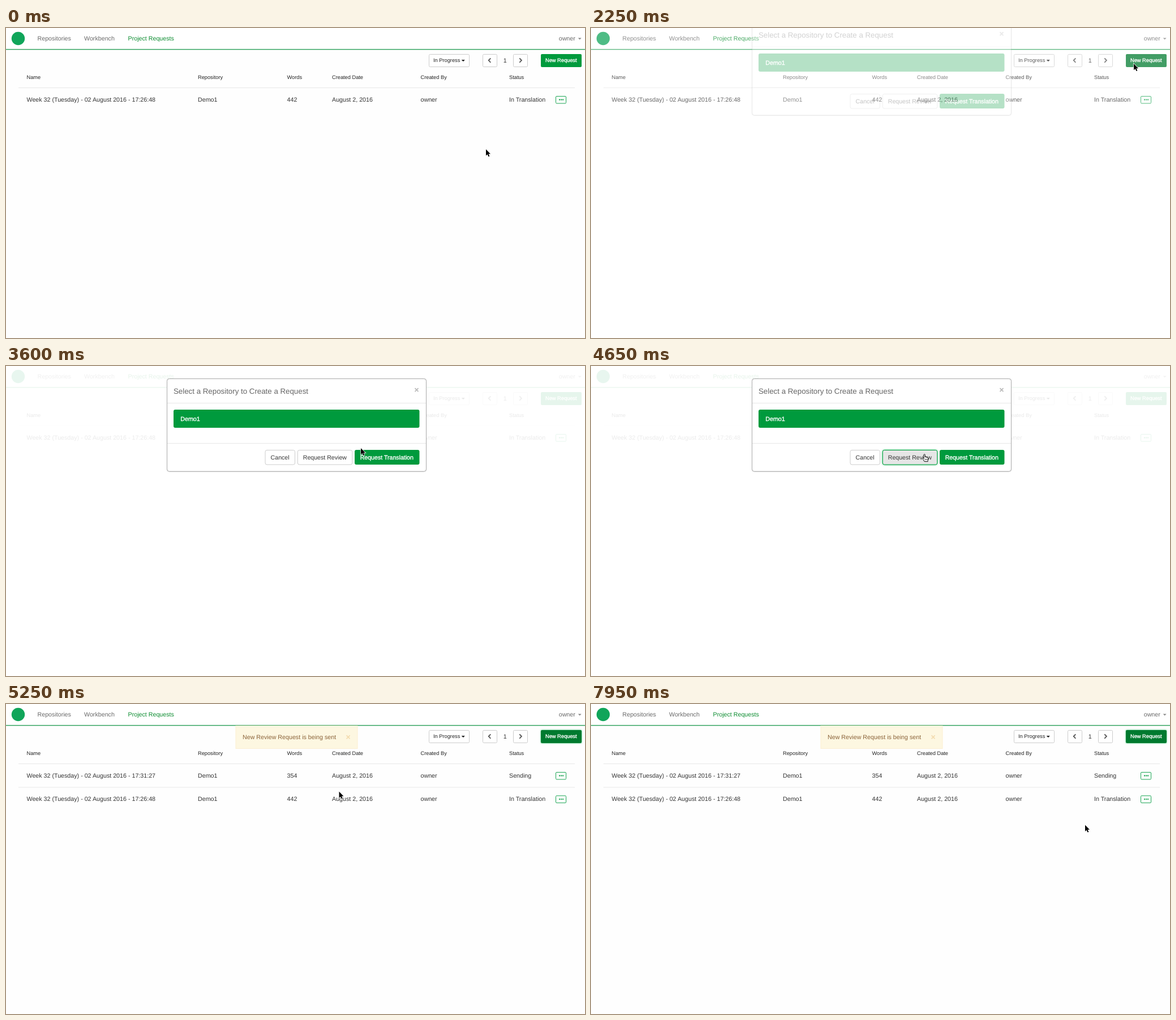
Write an HTML page that moves like this. It is 1023 px wide and 547 px high and loops after 8000 ms.

```html
<!DOCTYPE html>
<html lang="en">
<head>
<meta charset="utf-8">
<title>Project Requests</title>
<style>
  html, body { margin: 0; width: 100%; height: 100%; overflow: hidden; background: #fefefe; }
  svg { display: block; }
  text { font: 10.7px "Liberation Sans", Arial, sans-serif; fill: #333; text-rendering: geometricPrecision; }
  .small { font-size: 9.25px; fill: #222; }
  .button text { font-size: 10.6px; }
  .nav text { fill: #6a6a6a; }
  .nav .active { fill: #0c8c30; }
  .white, .button .white { fill: #fff; stroke: #fff; stroke-width: .35; }
  .box { fill: #fff; stroke: #ccc; }
  .green { fill: #009a3d; }
  .rule { stroke: #e8e8e8; }
  .chevron { fill: none; stroke: #555; stroke-width: 1.8; }
  #ok.focus { fill: #007a2f; }
  #ok.ring, #review.focus { filter: drop-shadow(0 0 1.5px #3fce78); }
  #review.hover { fill: #e6e6e6; stroke: #adadad; }
  #review.focus { stroke: #009a3d; }
  #panel { fill: #fff; stroke: #aaa; filter: drop-shadow(0 .5px .7px #0005); }
</style>
</head>
<body>
<svg width="1023" height="547" viewBox="0 0 1023 547">
  <rect width="1023" height="547" fill="#fefefe"/>
  <g class="nav">
    <rect width="1023" height="37" fill="#fff"/>
    <rect y="37" width="1023" height="1.5" fill="#3aa765"/>
    <circle cx="21.5" cy="18.5" r="11.7" fill="#10a55a"/>
    <text x="55.5" y="22.2">Repositories</text>
    <text x="138" y="22.2">Workbench</text>
    <text x="215.5" y="22.2" class="active">Project Requests</text>
    <text x="976.7" y="22.2">owner</text>
    <path d="M1010.7 17.6h6l-3 3z" fill="#888"/>
  </g>

  <rect class="box" x="747.5" y="46.5" width="71" height="22" rx="2"/>
  <text class="small" x="755" y="60.4">In Progress</text>
  <path d="M804.7 56h6.2l-3.1 3.2z" fill="#222"/>
  <rect class="box" x="842.5" y="46.5" width="25" height="22" rx="2"/>
  <path class="chevron" d="M856.3 53.4l-3.6 3.7 3.6 3.7"/>
  <text x="878.8" y="60.6">1</text>
  <rect class="box" x="896.5" y="46.5" width="25" height="22" rx="2"/>
  <path class="chevron" d="M907.3 53.4l3.6 3.7-3.6 3.7"/>
  <rect id="ok" class="green" x="945" y="46" width="72" height="23" rx="2"/>
  <text class="small white" x="953" y="60.4">New Request</text>

  <g id="table"><path class="rule" d="M22 105.5H1005"/></g>

  <g id="alert">
    <rect x="406" y="38.5" width="215" height="40" fill="#fdf7e1" stroke="#fbeed0"/>
    <text x="418" y="62" style="fill:#8a6238">New Review Request is being sent</text>
    <path d="M601.6 55.4l6 6m0-6l-6 6" stroke="#f3dcb0" stroke-width="1.7"/>
  </g>

  <rect id="backdrop" width="1023" height="547" fill="#fff"/>

  <g id="modal">
    <rect id="panel" x="284.5" y="22.5" width="458" height="163.5" rx="4"/>
    <path class="rule" d="M285 65.5H742M285 136.5H742"/>
    <text x="296" y="48.8" style="font-size:13.3px;fill:#666">Select a Repository to Create a Request</text>
    <path d="M722.5 39.2l6 6m0-6l-6 6" stroke="#bbb" stroke-width="1.8"/>
    <rect class="green" x="296" y="77" width="434.5" height="32" rx="3"/>
    <text class="white" x="308.3" y="96.9">Demo1</text>
    <g class="button">
      <rect class="box" x="458" y="148.5" width="52.5" height="25.5" rx="3"/>
      <text x="467.6" y="165">Cancel</text>
      <rect id="review" class="box" x="515.3" y="148.5" width="96.5" height="25.5" rx="3"/>
      <text x="524.8" y="165">Request Review</text>
      <rect class="green" x="616" y="148" width="114.5" height="26" rx="3"/>
      <text class="white" x="625.7" y="165">Request Translation</text>
    </g>
  </g>

  <path id="arrow" d="M0 0v11.2l2.6-2.3 1.9 4.2 1.9-.8-1.9-4.1h3.5z" stroke="#fff" stroke-width="1.4" paint-order="stroke"/>
  <g id="hand" fill="#fff" stroke="#000" stroke-width=".95" stroke-linejoin="round">
    <path d="M-.4 1.4q1-1.8 2.2 0v4l4.5 1q1.2.4 1.1 1.6l-.8 4.4v1.2h-6l-3.2-5.2q0-1.7 1.6-.8l.6.8z"/>
    <path d="M1.6 8.6v2.6m1.8-2.6v2.6m1.8-2.6v2.6" stroke-width=".7"/>
  </g>
</svg>
<script>
const $ = id => document.getElementById(id);
const clamp = v => Math.max(0, Math.min(1, v));
const easeOut = p => 1 - (1 - p) ** 1.61;
const place = (el, x, y) => el.setAttribute("transform", `translate(${x} ${y})`);
const show = (el, on) => el.style.display = on ? "" : "none";

const columns = [36.5, 339, 496.5, 576, 732.5, 889];
const texts = (cells, y, type = "") =>
  cells.map((s, i) => `<text class="${type}" x="${columns[i]}" y="${y}">${s}</text>`).join("");
const row = (id, clock, words, status) => `<g id="${id}">` +
  texts([`Week 32 (Tuesday) - 02 August 2016 - ${clock}`, "Demo1", words, "August 2, 2016", "owner", status], 129.9) +
  `<rect x="971.5" y="120.5" width="18" height="12.5" rx="1.5" fill="#fff" stroke="#1aa553"/>` +
  `<path d="M977 126.5h8" stroke="#009a3d" stroke-width="1.9" stroke-dasharray="2 1"/></g>`;

$("table").innerHTML +=
  texts(["Name", "Repository", "Words", "Created Date", "Created By", "Status"], 90, "small") +
  row("fresh", "17:31:27", 354, "Sending") + row("older", "17:26:48", 442, "In Translation");
$("fresh").innerHTML += `<path class="rule" d="M22 147H1005"/>`;

// Pointer keys: time, x, y
const pointer = [
  [300, 848, 214], [900, 959, 63], [3000, 959, 63], [3750, 588.5, 154.5], [6900, 588.5, 154.5],
  [7050, 520, 165], [7200, 375, 198], [7350, 266, 224], [7500, 300, 228],
  [7650, 490, 226], [7800, 745, 219], [7950, 873, 213.5]
];

function pointerAt(t) {
  const i = pointer.findIndex(k => k[0] > t);
  if (i < 1) return (i ? pointer.at(-1) : pointer[0]).slice(1);
  const [t0, x0, y0] = pointer[i - 1], [t1, x1, y1] = pointer[i];
  const p = (t - t0) / (t1 - t0), e = p * p * (3 - 2 * p);
  return [x0 + (x1 - x0) * e, y0 + (y1 - y0) * e];
}

function draw(now) {
  const loop = now % 8000, t = loop - loop % 150;
  const opening = t < 4650, age = t - (opening ? 2207 : 4740);
  const fade = clamp(age / 150), slide = easeOut(clamp(age / 300));
  const opacity = opening ? fade : 1 - fade;
  $("modal").style.opacity = opacity;
  $("backdrop").style.opacity = .9 * opacity;
  place($("modal"), 0, -41 * (opening ? 1 - slide : slide));

  const sent = t >= 4950, listed = t >= 5250;
  $("ok").classList.toggle("focus", sent || t >= 2100 && t < 3150);
  $("ok").classList.toggle("ring", sent);
  $("review").classList.toggle("hover", t >= 3750);
  $("review").classList.toggle("focus", t >= 4200);
  show($("alert"), sent);
  show($("fresh"), listed);
  place($("older"), 0, listed ? 41.4 : 0);

  const [x, y] = pointerAt(t);
  const pointing = t >= 900 && t < 2250 || t >= 3750 && t < 4950;
  show($("hand"), pointing);
  show($("arrow"), !pointing);
  place($("arrow"), x, y);
  place($("hand"), x, y + .5);
}

const start = performance.now();
(function tick() {
  draw(performance.now() - start);
  requestAnimationFrame(tick);
})();
</script>
</body>
</html>
```
